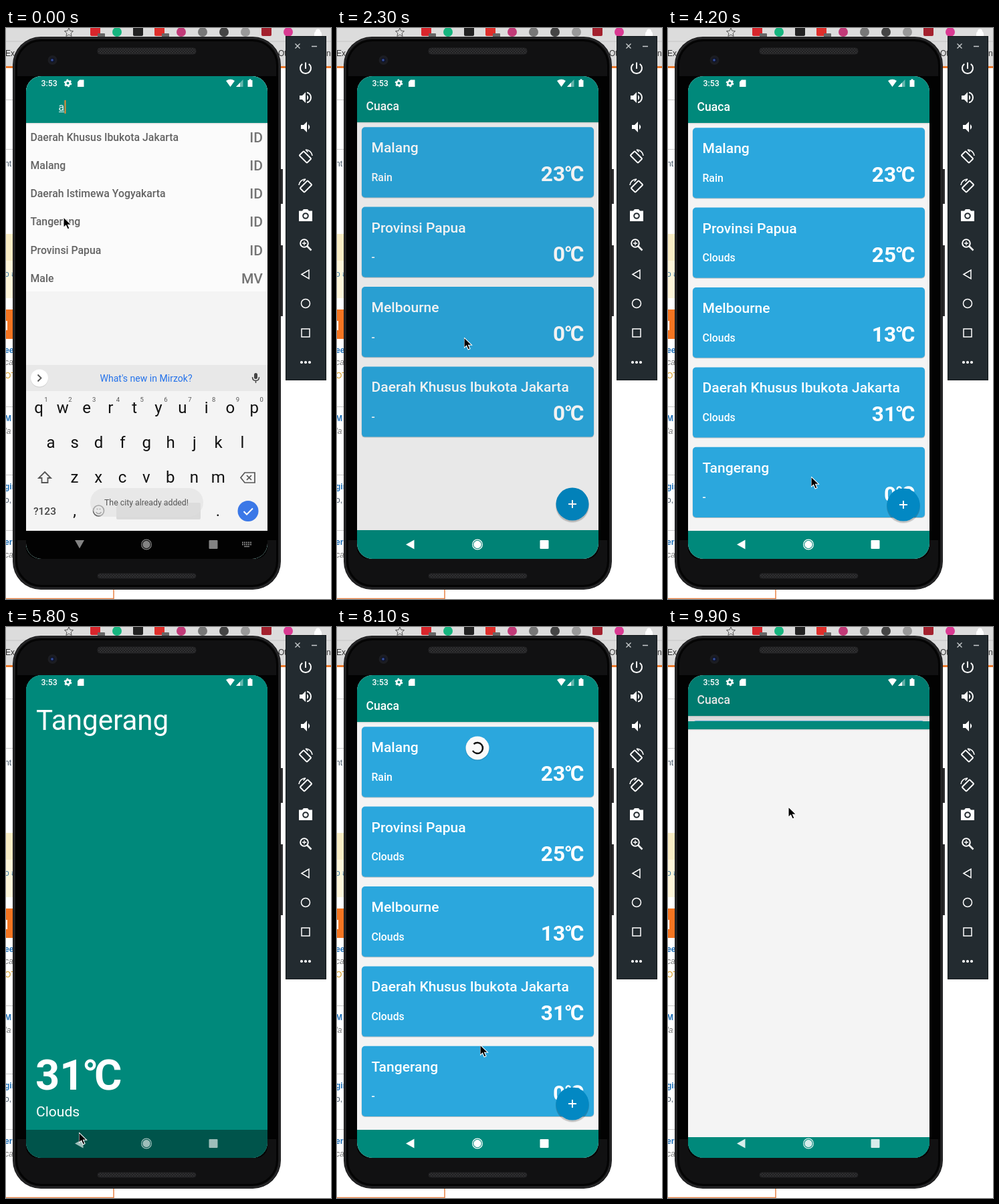
An HTML page for the animation above (10000 ms loop, 486 px wide and 854 px high).

```html
<!DOCTYPE html>
<html lang="en">
<head>
<meta charset="utf-8">
<title>Weather app</title>
<style>
html, body { margin: 0; width: 100%; height: 100%; overflow: hidden; background: #fff; }
#stage { position: relative; width: 486px; height: 854px; overflow: hidden; }
#stage svg, .win { position: absolute; left: 0; top: 0; width: 486px; height: 854px; display: block; }
#screen { clip-path: inset(72px 95px 60px 30px round 23px); }
text { font-family: Roboto, 'Noto Sans CJK SC', 'Noto Sans CJK JP', 'Noto Sans CJK', sans-serif; white-space: pre; }
.m { font-weight: 500; }
.b { font-weight: 700; }
.page text { font-family: 'Liberation Sans', Arial, sans-serif; font-size: 12px; }
.line { fill: none; stroke: #fff; stroke-width: 2; }
#arc, #ball { transform-origin: 210px 181px; }
</style>
</head>
<body>
<div id="stage">
  <svg class="page" viewBox="0 0 486 854">
    <rect width="486" height="58" fill="#dcdcdc"/>
    <path d="M0 20H486" stroke="#c4c4c4"/>
    <rect y="57" width="486" height="3" fill="#ee7a2b"/>
    <g id="tools"></g>
    <path d="M94 0l1.900 4.200 4.600 .5-3.400 3.100 1 4.500-4.100-2.300-4.100 2.300 1-4.500-3.400-3.100 4.600-.5z" fill="none" stroke="#555"/>
    <path d="M461 13v-4q0-3 2-4a3 3 0 1 1 7 0q2 1 2 4v4z" fill="#fff"/>
    <text x="-1" y="42" fill="#333">Ex</text>
    <text x="407" y="42" fill="#333">Ot</text>
    <text x="479" y="42" fill="#333">na</text>
    <rect y="308" width="12" height="96" fill="#fdf5d9"/>
    <rect y="308" width="12" height="40" fill="#f8ecc4"/>
    <path d="M0 107.500H12M0 181.500H12M0 566.500H12M0 668.500H12M0 751.500H12" stroke="#ccc"/>
    <rect y="421" width="12" height="44" fill="#f47521"/>
    <rect y="438" width="2" height="14" fill="#fff"/>
    <g id="notes"></g>
    <path d="M0 853.500H161V838" fill="none" stroke="#e98245" stroke-width="1.500"/>
  </svg>

  <svg viewBox="0 0 486 854">
    <defs>
      <pattern id="mesh" width="4" height="4" patternUnits="userSpaceOnUse"><rect width="4" height="4" fill="#1f1f20"/><path d="M0 0h2v2h2v2h-2v-2h-2z" fill="#303032"/></pattern>
    </defs>
    <path d="M411 211h3v52h-3zM411 325h3v106h-3z" fill="#2c2c2e"/>
    <rect x="10" y="13" width="401" height="827" rx="42" fill="#1a1a1b"/>
    <rect x="12" y="15" width="397" height="823" rx="40" fill="none" stroke="#343436"/>
    <rect x="15.500" y="18.500" width="390" height="816" rx="37" fill="#111112" stroke="#040404" stroke-width="3"/>
    <rect x="14" y="72" width="393" height="694" fill="#020202"/>
    <rect x="30" y="760" width="361" height="34" rx="17" fill="#020202"/>
    <rect x="137" y="30" width="147" height="9" rx="4" fill="url(#mesh)" stroke="#262628"/>
    <rect x="137" y="816" width="147" height="7" rx="3.500" fill="url(#mesh)" stroke="#222224"/>
    <circle cx="69.500" cy="48" r="7" fill="#1c1d22"/>
    <circle cx="69.500" cy="48" r="3.500" fill="#10152c"/>
    <circle cx="69" cy="48" r="1.800" fill="#3551a0"/>
  </svg>

  <div id="screen" class="win">
    <svg id="main" viewBox="0 0 486 854">
      <rect x="30" y="72" width="361" height="740" fill="#f4f4f4"/>
      <g id="cards"></g>
      <g id="drop"><g id="ball">
        <circle cx="210" cy="182" r="18" opacity=".1"/>
        <circle cx="210" cy="181" r="17.500" fill="#fafafa"/>
        <path id="arc" d="M204.500 175.200A8 8 0 1 1 203 185" fill="none" stroke="#111" stroke-width="2.500"/>
      </g></g>
      <rect x="30" y="142" width="361" height="1.500" opacity=".1"/>
      <rect x="30" y="60" width="361" height="82" fill="#00897b"/>
      <text class="m" x="43.600" y="124" font-size="17.560" fill="#fff">Cuaca</text>
      <circle cx="352" cy="716" r="25" opacity=".08"/>
      <circle cx="352" cy="715" r="25" opacity=".14"/>
      <circle cx="352" cy="713" r="24.500" fill="#0288c3"/>
      <path class="line" d="M346 713h12M352 707v12"/>
      <rect x="30" y="752" width="361" height="60" fill="#00897b"/>
    </svg>
    <svg id="dim" viewBox="0 0 486 854"><rect width="486" height="854"/></svg>

    <div id="searchClip" class="win"><svg id="search" viewBox="0 0 486 854">
      <rect x="30" y="72" width="361" height="740" fill="#f4f4f4"/>
      <g id="found"><rect x="30" y="142" width="361" height="252" fill="#fbfbfb"/></g>
      <rect x="30" y="142" width="361" height="1.500" opacity=".1"/>
      <rect x="30" y="72" width="361" height="70" fill="#00897b"/>
      <g id="query">
        <text x="78.600" y="123.500" font-size="15.800" fill="#e8f4f2">a</text>
        <path d="M79 125.500h8" stroke="#e8f4f2"/>
        <rect id="caret" x="87.500" y="108" width="2" height="20" fill="#ee8a35"/>
      </g>
      <rect x="30" y="752" width="361" height="60" fill="#00897b"/>
      <g id="keyboard">
        <rect x="30" y="504" width="361" height="40" fill="#e8e8e8"/>
        <rect x="30" y="543" width="361" height="300" fill="#f4f4f4"/>
        <circle cx="50" cy="524.500" r="13" opacity=".12"/>
        <circle cx="50" cy="523.500" r="13" fill="#fff"/>
        <path d="M47.500 518.500l5 5-5 5" fill="none" stroke="#555" stroke-width="1.800"/>
        <text x="209.500" y="528.500" font-size="14.050" text-anchor="middle" fill="#2472ea">What's new in Mirzok?</text>
        <rect x="371" y="516" width="5" height="9" rx="2.500" fill="#444"/>
        <path d="M368.500 522q0 5.500 5 5.500t5-5.500M373.500 527v4" fill="none" stroke="#444" stroke-width="1.500"/>
        <g id="keys"></g>
        <path d="M58 664l9 9h-4.500v7h-9v-7h-4.500z" fill="none" stroke="#555" stroke-width="1.800"/>
        <path d="M357 665h15v15h-15l-6-7.500zM360 669l7 7m0-7l-7 7" fill="none" stroke="#555" stroke-width="1.700"/>
        <text class="m" x="58" y="728" font-size="15.500" text-anchor="middle" fill="#444">?123</text>
        <rect x="165" y="710" width="126" height="25" rx="2" fill="#dadada"/>
        <circle cx="362" cy="722.500" r="15.500" fill="#3b78e7"/>
        <path d="M355.500 723l4.500 4.500 9-9" class="line"/>
        <circle cx="138.500" cy="722" r="8" fill="none" stroke="#666" stroke-width="1.700"/>
        <path d="M134.500 724q4 5 8 0M135.500 719.500h2M139.500 719.500h2" fill="none" stroke="#666" stroke-width="1.700"/>
      </g>
      <g id="toast">
        <rect x="126" y="688" width="169" height="43" rx="21.500" fill="#dfdfdf" opacity=".55"/>
        <text x="210" y="714" font-size="12.300" text-anchor="middle" fill="#555">The city already added!</text>
      </g>
    </svg></div>

    <div id="detailClip" class="win"><svg id="detail" viewBox="0 0 486 854">
      <rect x="30" y="72" width="361" height="740" fill="#00897b"/>
      <rect x="30" y="752" width="361" height="60" fill="#00544b"/>
      <g fill="#fff">
        <text x="45" y="153.500" font-size="42.140">Tangerang</text>
        <g id="blank"><text class="b" x="44" y="692" font-size="63.200">0℃</text><text x="45" y="732" font-size="21.070">-</text></g>
        <g id="loaded"><text class="b" x="44" y="692" font-size="63.200">31℃</text><text x="45" y="732" font-size="21.070">Clouds</text></g>
      </g>
    </svg></div>

    <svg viewBox="0 0 486 854">
      <g fill="#fff">
        <text class="m" x="52.500" y="87" font-size="12.300">3:53</text>
        <circle cx="92.500" cy="82.500" r="3.300" fill="none" stroke="#fff" stroke-width="2.600"/>
        <circle cx="92.500" cy="82.500" r="5" fill="none" stroke="#fff" stroke-width="1.800" stroke-dasharray="2.600 2.636"/>
        <path d="M110 77.500h6.500v10.500h-9.500v-7.500z"/>
        <path d="M329 79q6.500-4.500 13 0l-6.500 9z"/>
        <path d="M344 88l10.500-11v11z" opacity=".4"/><path d="M344 88l6-6.300v6.300z"/>
        <path d="M361.500 78h2v-1.500h3v1.500h2v10h-7z"/>
      </g>
      <g id="navLight" fill="#fff">
        <path d="M103 772.500l12.500-7v14z"/>
        <circle cx="210" cy="772.500" r="5.700"/><circle cx="210" cy="772.500" r="7.400" fill="none" stroke="#fff" stroke-width="1.200"/>
        <rect x="303.500" y="766" width="13" height="13" rx="1"/>
      </g>
      <g id="navDark">
        <rect x="30" y="752" width="361" height="42" fill="#020202"/>
        <g fill="#838383">
          <path d="M103 766h14l-7 12.500z"/>
          <circle cx="210" cy="772.500" r="5.700"/><circle cx="210" cy="772.500" r="7.400" fill="none" stroke="#838383" stroke-width="1.200"/>
          <rect x="303.500" y="766" width="13" height="13" rx="1"/>
        </g>
        <path d="M353 769.500h14M353 772.500h14" stroke="#838383" stroke-width="2" stroke-dasharray="2 1"/><path d="M356 775.500h8" stroke="#838383" stroke-width="1.500"/>
      </g>
    </svg>
  </div>

  <svg viewBox="0 0 486 854">
    <rect x="418.500" y="12.500" width="60" height="514" fill="#232b30" stroke="#12171a"/>
    <path d="M432.500 23.500l7 7m0-7l-7 7M457 27.500h8" stroke="#c8ccce" stroke-width="1.400"/>
    <g class="line" transform="translate(448 60)"><path d="M0-8.500V1M-4.800-6.300a8 8 0 1 0 9.600 0"/></g>
    <g transform="translate(448 104)">
      <path d="M-9-3h4l5-5V8l-5-5h-4z" fill="#fff"/><path d="M2-4q4.500 4 0 8" fill="#fff"/>
      <path class="line" d="M2-7.500a7.700 7.700 0 0 1 0 15"/>
    </g>
    <g transform="translate(448 148)" fill="#fff"><path d="M-7-3h4l5-5V8l-5-5h-4z"/><path d="M4-4q4.500 4 0 8z"/></g>
    <g id="turn" class="line" transform="translate(448 192)">
      <rect x="-4.500" y="-8" width="9" height="16" rx="1" transform="translate(-.5 1) rotate(-45)"/>
      <path d="M0-10a10 10 0 0 1 10 9M0-10l3.500 3.500" stroke-width="1.600"/>
    </g>
    <use href="#turn" transform="translate(896 44) scale(-1 1)"/>
    <g transform="translate(448 280)"><path d="M-10-6.500h5l2-2.500h6l2 2.500h5v15.500h-20z" fill="#fff"/><circle cy="1" r="3.800" fill="#fff" stroke="#232b30" stroke-width="2"/></g>
    <g class="line" transform="translate(446 322)"><circle r="5.800"/><path d="M4.500 4.500l6 6" stroke-width="2.500"/><path d="M-3 0h6M0-3v6" stroke-width="1.300"/></g>
    <g fill="none" stroke="#fff" stroke-width="1.500"><path d="M442 368.500l11-6.500v13z"/><circle cx="448" cy="412" r="6.500"/><rect x="442" y="450" width="12" height="12"/></g>
    <g fill="#fff"><circle cx="442" cy="500" r="2.100"/><circle cx="448" cy="500" r="2.100"/><circle cx="454" cy="500" r="2.100"/></g>
  </svg>

  <svg id="mouse" viewBox="0 0 486 854">
    <path d="M0 0V15.500L3.600 12.200 6.200 18 9 16.800 6.500 11.200H11.500z" fill="#000" stroke="#fff" stroke-width="1.100"/>
  </svg>
</div>

<script>
const LOOP = 10000, TICK = 100;
const $ = id => document.getElementById(id);
const add = (id, markup) => $(id).insertAdjacentHTML('beforeend', markup);
const label = (x, y, size, str, attrs = '') => `<text x="${x}" y="${y}" font-size="${size}" ${attrs}>${str}</text>`;

// Browser page behind the phone
const tools = ['#d8262c', '#16b57f', '#222', '#df2f2b', '#c13a78', '#777', '#444', '#999', '#a3212e', '#d93a92'];
add('tools', tools.map((c, i) => {
  const x = 134 + i * 32;
  return [0, 2, 3, 8].includes(i)
    ? `<rect x="${x - 8}" y="-3" width="15" height="15" rx="2" fill="${c}"/>`
    : `<circle cx="${x}" cy="6" r="7" fill="${c}"/>`;
}).join('') + [142, 238].map(x => `<rect x="${x - 5}" y="8" width="11" height="6" rx="1" fill="#666"/>`).join(''));

const bold = 'font-weight="bold" fill="#1c6fb8"', slant = 'font-style="italic" fill="#777"';
[['nt', 207, 'fill="#456"'], ['o #', 372, 'fill="#3a7aa8"'], ['ee', 486, bold], ['cat', 504, slant],
 ['OT', 524, 'fill="#d99a1c"'], ['M', 588, bold], ['la', 607, slant], ['gin', 690, bold],
 ['o,', 710, 'fill="#456"'], ['er', 773, bold], ['ca', 792, slant]]
  .forEach(([s, y, a]) => add('notes', label(-2, y, 12, s, a)));

// City cards
const cities = [
  ['Malang', 'Rain', 23, 'Rain', 23],
  ['Provinsi Papua', '-', 0, 'Clouds', 25],
  ['Melbourne', '-', 0, 'Clouds', 13],
  ['Daerah Khusus Ibukota Jakarta', '-', 0, 'Clouds', 31],
  ['Tangerang', '', '', '-', 0]
];
const values = (y, sky, deg) =>
  label(51.5, y + 80.500, 15.800, sky, 'class="m"') +
  label(369.5, y + 81, 31.600, deg + '℃', 'class="b" text-anchor="end"');
cities.forEach(([name, sky0, deg0, sky1, deg1], i) => {
  const y = 149.200 + i * 119.400;
  add('cards', `<g ${i === 4 ? 'id="fifth"' : ''} fill="#fff">
    <rect x="36.700" y="${y + .8}" width="347.600" height="105.400" rx="5" fill="#000" opacity=".2"/>
    <rect x="37" y="${y}" width="347" height="105.200" rx="5" fill="#2ba7dd"/>
    ${label(51.5, y + 38, 21.070, name, 'class="m"')}
    ${i === 4 ? '' : `<g class="old">${values(y, sky0, deg0)}</g>`}
    <g class="new">${values(y, sky1, deg1)}</g></g>`);
});

// Search results
[['Daerah Khusus Ibukota Jakarta', 'ID'], ['Malang', 'ID'], ['Daerah Istimewa Yogyakarta', 'ID'],
 ['Tangerang', 'ID'], ['Provinsi Papua', 'ID'], ['Male', 'MV']].forEach(([city, code], i) => {
  const y = 169 + i * 42.140;
  add('found', label(36.5, y, 15.800, city, 'class="m" fill="#636363"') +
    label(384, y + 2, 21.070, code, 'class="m" text-anchor="end" fill="#747474"'));
});

// Keyboard
const row = (letters, x, y) => [...letters].forEach((c, i) =>
  add('keys', label(x + i * 35.800, y, 24, c, 'text-anchor="middle" fill="#111"')));
row('qwertyuiop', 49, 576);
row('asdfghjkl', 67, 628);
row('zxcvbnm', 102.500, 680);
row(',', 102.500, 730);
row('.', 317, 730);
[...'1234567890'].forEach((c, i) => add('keys', label(60 + i * 35.800, 559, 9.500, c, 'text-anchor="middle" fill="#555"')));

// Tracks: [time, value]; moves advance once per tick, holds jump
function play(el, prop, track, hold) {
  const last = track[track.length - 1];
  const all = last[0] < LOOP ? [...track, [LOOP, last[1]]] : track;
  const frames = all.map(([t, v], i) => {
    const span = i + 1 < all.length ? all[i + 1][0] - t : TICK;
    return { offset: t / LOOP, [prop]: v, easing: `steps(${hold ? 1 : Math.max(1, Math.round(span / TICK))}, end)` };
  });
  el.animate(frames, { duration: LOOP, iterations: Infinity, delay: -20 });
}
const show = (el, track) => play(el, 'opacity', track, true);
const fade = (id, track) => play($(id), 'opacity', track);
const shiftY = (id, track) => play($(id), 'transform', track.map(([t, y]) => [t, `translate(0px, ${y}px)`]));
const clipTop = (id, track) => play($(id), 'clipPath', track.map(([t, y]) => [t, `inset(${y}px 0px 0px 0px)`]));

// A window opens upward over the list and closes downward
const opening = t => ({
  clip: [[t, 794], [t + 100, 350], [t + 200, 141], [t + 300, 90], [t + 400, 72]],
  top: [[t, 30], [t + 100, 21], [t + 200, 11], [t + 300, 4], [t + 400, 0]],
  back: [[t, 0], [t + 100, -4], [t + 200, -9], [t + 300, -12], [t + 400, -14]],
  dim: [[t, 0], [t + 100, .06], [t + 200, .1]]
});
const closing = t => ({
  clip: [[t, 72], [t + 100, 240], [t + 200, 560], [t + 300, 750], [t + 400, 794]],
  top: [[t, 0], [t + 100, 10], [t + 200, 20], [t + 300, 27], [t + 400, 30]],
  back: [[t, -14], [t + 100, -10], [t + 200, -6], [t + 300, -3], [t + 400, -1], [t + 500, 0]],
  dim: [[t, .1], [t + 300, .08], [t + 400, .05], [t + 500, 0]]
});
const leave = closing(1900), enter = opening(4600), back = closing(7200), again = opening(9700);
const cut = track => track.filter(([t]) => t < LOOP);

clipTop('searchClip', [[0, 72], ...leave.clip, ...cut(again.clip)]);
shiftY('search', [[0, 0], ...leave.top, ...cut(again.top)]);
clipTop('detailClip', [[0, 794], ...enter.clip, ...back.clip]);
shiftY('detail', [[0, 30], ...enter.top, ...back.top]);
shiftY('main', [[0, -14], ...leave.back, ...enter.back, ...back.back, ...cut(again.back)]);
fade('dim', [[0, .1], ...leave.dim, ...enter.dim, ...back.dim, ...cut(again.dim)]);

fade('toast', [[0, 1], [200, 0]]);
show($('caret'), [[0, 1], [500, 0], [1000, 1], [1500, 0]]);
show($('query'), [[0, 1], [2400, 0]]);
show($('found'), [[0, 1], [2400, 0]]);
shiftY('keyboard', [[0, 0], [900, 0], [1200, 290]]);
show($('navDark'), [[0, 1], [1100, 0]]);
fade('navLight', [[0, 1], [4600, 1], [4900, .62], [7200, .62], [7500, 1], [9700, 1], [9900, .85]]);

show($('cards'), [[0, 1], [3000, 0], [3800, 1], [8500, 0], [9300, 1]]);
show($('fifth'), [[0, 0], [3000, 1]]);
document.querySelectorAll('.old').forEach(el => show(el, [[0, 1], [3000, 0]]));
document.querySelectorAll('.new').forEach(el => show(el, [[0, 0], [3000, 1]]));
show($('blank'), [[0, 1], [5300, 0]]);
show($('loaded'), [[0, 0], [5300, 1]]);

shiftY('drop', [[0, -80], [2500, -80], [2800, 0], [4000, 0], [4100, -80], [7700, -80], [8000, 0], [9500, 0], [9600, -80]]);
play($('ball'), 'transform', [[0, 'scale(1)'], [3700, 'scale(1)'], [3900, 'scale(0)'], [4200, 'scale(1)'], [9200, 'scale(1)'], [9400, 'scale(0)']]);
play($('arc'), 'transform', [[0, 'rotate(-36deg)'], [LOOP, 'rotate(3564deg)']]);

play($('mouse'), 'transform', [
  [0, 86, 283], [400, 86, 283], [800, 110, 768], [1400, 110, 768], [1600, 112, 782], [1900, 110, 768],
  [2300, 190, 463], [2500, 200, 330], [2900, 205, 780], [3200, 206, 806], [3600, 212, 720],
  [4200, 214, 671], [4700, 214, 671], [5300, 112, 772], [5800, 109, 756], [6300, 112, 785],
  [6900, 109, 768], [7200, 109, 768], [7700, 205, 330], [8100, 214, 625], [8500, 225, 770],
  [8700, 230, 770], [9100, 349, 764], [9300, 350, 712], [9600, 350, 712], [9900, 180, 269]
].map(([t, x, y]) => [t, `translate(${x}px, ${y}px)`]));
</script>
</body>
</html>
```
